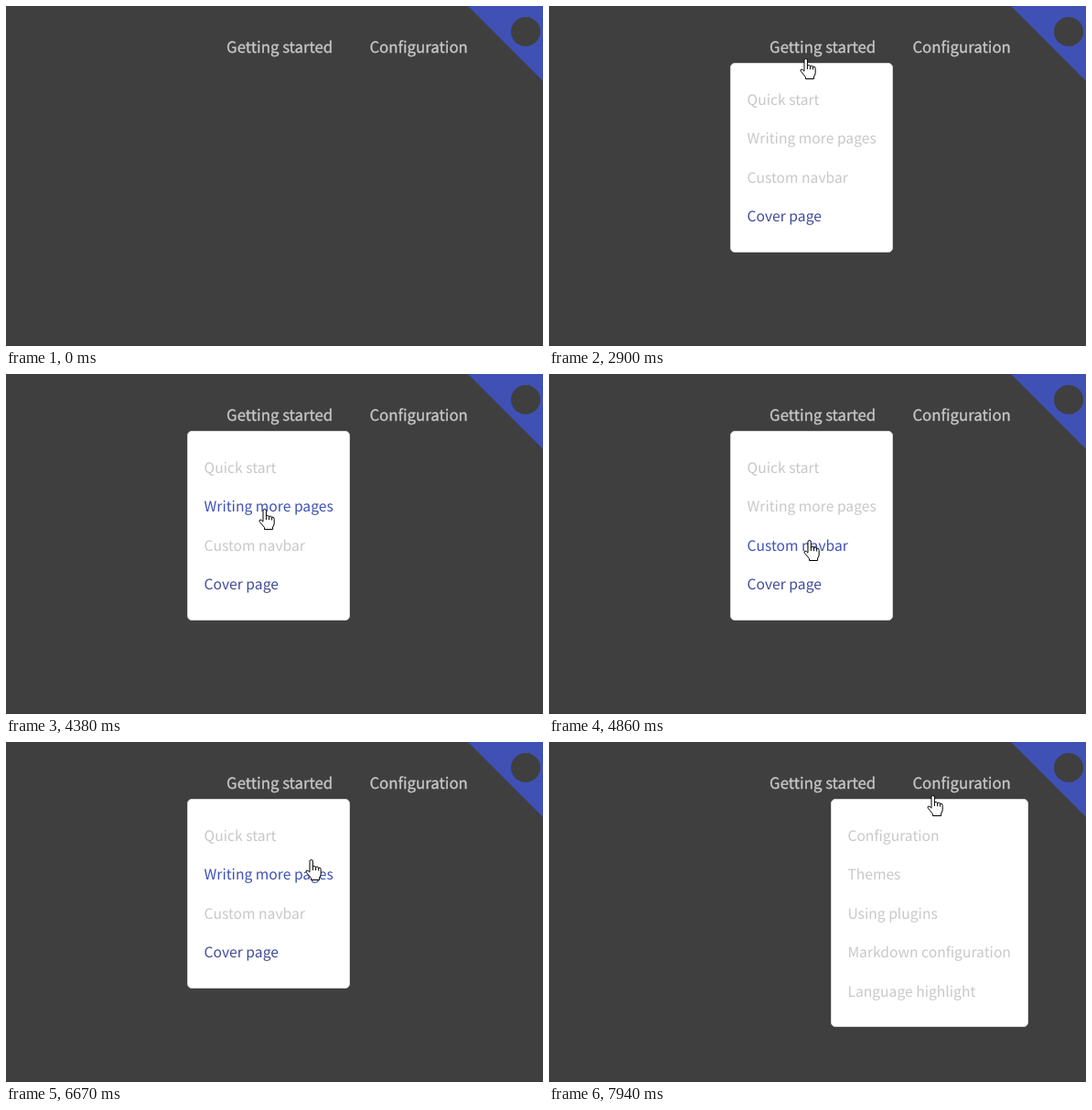
Animation, 587 px wide and 371 px high, one loop 8 s. Source, as an HTML page:

```html
<!DOCTYPE html>
<html lang="en">
<head>
<meta charset="utf-8">
<title>Navbar menus</title>
<style>
  html, body { margin: 0; width: 100%; height: 100%; overflow: hidden; background: #3f3f3f; }
  svg { display: block; }
  text {
    font-family: "Noto Sans CJK SC", "Noto Sans CJK JP", "Noto Sans CJK", "Open Sans", sans-serif;
    fill: #c8c8c8;
    text-rendering: geometricPrecision;
  }
  .nav { font-size: 16.79px; stroke: #c8c8c8; stroke-width: .3px; }
  .menu { visibility: hidden; font-size: 15.67px; }
  .menu.open { visibility: visible; }
  .menu rect { fill: #fff; stroke: #d4d4d4; }
  .menu .visited { fill: #414b98; }
  .menu .hover { fill: #3f51b5; }
  .cursor path { fill: #fff; stroke: #000; stroke-linejoin: round; }
  .cursor .lines { fill: none; }
</style>
</head>
<body>
<svg width="587" height="371" viewBox="0 0 587 371">
  <rect width="587" height="371" fill="#3f3f3f"/>
  <rect y="370" width="587" height="1" fill="#3b393a"/>
  <path d="M505 0H587V82Z" fill="#3f51b5"/>
  <circle cx="568" cy="28" r="16" fill="#3f3f3f"/>
  <g class="nav">
    <text x="241.1" y="51">Getting started</text>
    <text x="397.4" y="51">Configuration</text>
  </g>
  <g class="menu" id="start"><rect x="198.5" y="62.5" width="177" height="206" rx="4.5"/></g>
  <g class="menu" id="config"><rect x="308.5" y="62.5" width="215" height="248" rx="4.5"/></g>
  <g class="cursor" id="cursor">
    <path id="arrow" d="M.5 .5V16.7l3.7-3.5 2.5 5.6 2.6-1.1-2.4-5.4h5z"/>
    <g id="hand">
      <path d="M-2 13.5V2.2a1.7 1.7 0 0 1 3.4 0V8q1.7-1.3 3.2.4q1.7-.9 3 .7q2.6-.6 2.6 2.2V16q0 2-1.6 4V22.5H-.5V20.5L-5.6 14.4q-1-1.9.4-2.4q1.2-.3 3.2 2.2z"/>
      <path class="lines" d="M1.4 8v4M4.6 8.4v3.8M7.6 9.1v3.4"/>
    </g>
  </g>
</svg>
<script>
const LOOP = 8000, STEP = 68, ROW = 42.5, FIRST_ROW = 81;
const $ = id => document.getElementById(id);

// The cursor glides from one resting point to the next, slowing down on the way.
const entry = { x: 485, y: 385 };
const moves = [
  { from: 660, to: 1220, x: 280, y: 83 },
  { from: 1550, to: 1820, x: 281, y: 47 },
  { from: 2900, to: 3370, x: 280, y: 100 },
  { from: 3700, to: 4180, x: 283, y: 138, slow: 7 },
  { from: 4380, to: 5000, x: 285, y: 182, slow: 2.3 },
  { from: 5200, to: 5620, x: 289, y: 209 },
  { from: 6080, to: 6410, x: 291, y: 222, slow: 0.5 },
  { from: 6610, to: 6810, x: 376, y: 33, slow: 1 },
  { from: 7140, to: 7410, x: 421, y: 38, slow: 2 },
  { from: 7940, to: 7940, x: 420, y: 58 }
];

function addItems(menu, x, labels) {
  return labels.map((label, i) => {
    const text = document.createElementNS("http://www.w3.org/2000/svg", "text");
    text.setAttribute("x", x);
    text.setAttribute("y", Math.floor(108 + i * ROW));
    text.textContent = label;
    menu.append(text);
    return text;
  });
}

const startItems = addItems($("start"), 216.6,
  ["Quick start", "Writing more pages", "Custom navbar", "Cover page"]);
startItems[3].classList.add("visited");
addItems($("config"), 326.4,
  ["Configuration", "Themes", "Using plugins", "Markdown configuration", "Language highlight"]);

function position(t) {
  const i = moves.findLastIndex(m => t >= m.from);
  if (i < 0) return null;
  const { from, to, x, y, slow = 1.5 } = moves[i];
  const start = moves[i - 1] || entry;
  const steps = Math.round((to - from) / STEP) + 1;
  const done = Math.min(steps, Math.floor((t - from) / STEP + 0.15) + 1) / steps;
  const p = 1 - (1 - done) ** slow;
  return [start.x + (x - start.x) * p, start.y + (y - start.y) * p].map(Math.round);
}

function draw(t) {
  const point = position(t);
  const startOpen = t >= 1680 && t < 6800;
  const configOpen = t >= 7200;
  $("start").classList.toggle("open", startOpen);
  $("config").classList.toggle("open", configOpen);
  $("cursor").style.display = point ? "" : "none";
  if (!point) return;

  const [x, y] = point;
  const row = startOpen ? Math.floor((y - FIRST_ROW) / ROW - 0.02) : -1;
  startItems.forEach((item, i) => item.classList.toggle("hover", i === row && i < 3));
  const overLink = configOpen || startOpen && (y < 62 || row >= 0);
  $("cursor").setAttribute("transform", `translate(${x} ${y})`);
  $("hand").style.display = overLink ? "" : "none";
  $("arrow").style.display = overLink ? "none" : "";
}

const begin = performance.now();
function tick() {
  draw((performance.now() - begin) % LOOP);
  requestAnimationFrame(tick);
}
tick();
</script>
</body>
</html>
```
